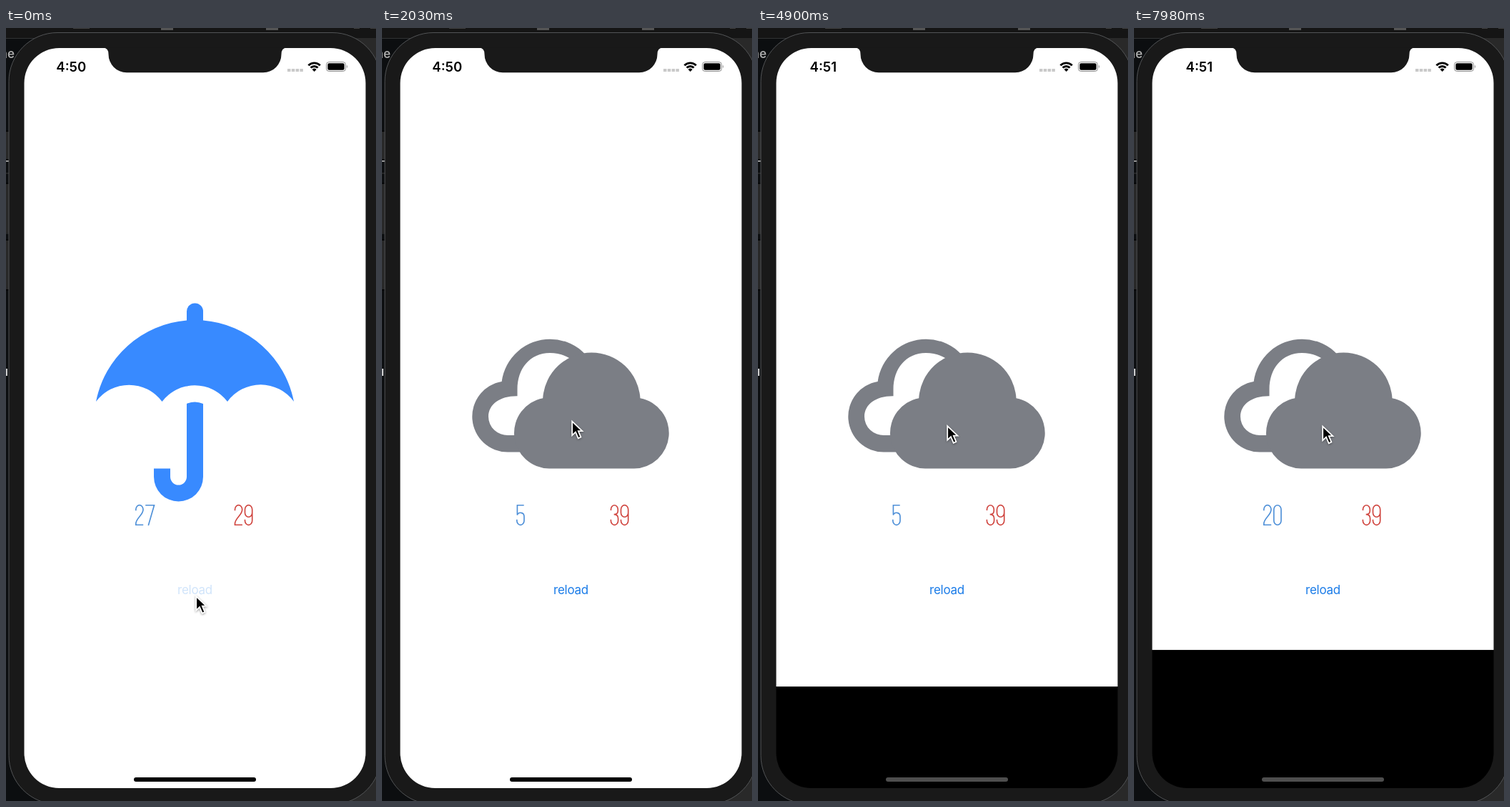
Animation of 518x1080 px, one loop 8000 ms. Source, as an HTML page:

```html
<!DOCTYPE html>
<html lang="en">
<head>
<meta charset="utf-8">
<title>Weather reload</title>
<style>
  html, body { margin: 0; width: 100%; height: 100%; overflow: hidden; background: #0c0e10; }
  svg { display: block; width: 518px; height: 1080px; }
  text { font-family: Inter, "Liberation Sans", sans-serif; }
  .button { font-size: 17px; letter-spacing: -.25px; text-anchor: middle; }
  .digits { fill: none; stroke-width: 1.65; }
  #cursor { filter: drop-shadow(0 1px 1.5px rgba(0, 0, 0, .4)); }
</style>
</head>
<body>
<svg viewBox="0 0 518 1080">
  <defs>
    <clipPath id="view"><rect x="25" y="28" width="479" height="1035"/></clipPath>
  </defs>

  <!-- desktop behind the phone -->
  <rect width="518" height="1080" fill="#0c0e10"/>
  <rect x="480" width="38" height="1080" fill="#292929"/>
  <rect width="518" height="14" fill="#151515"/>
  <path d="M0 14.5H50" stroke="#303234"/>
  <path d="M94 0h23M487 0h8M510 0h8" stroke="#505050" stroke-width="1.5"/>
  <path d="M217 0h17v3h-17zM364 0h17v3h-17z" fill="#555"/>
  <path d="M0 145h5v38H0zM0 218h5v68H0zM0 297h5v68H0z" fill="#282828"/>
  <path d="M0 144h5M0 217h5M0 296h5M0 366h5" stroke="#000"/>
  <path d="M0 203h5M0 287h5" stroke="#3c3c3c"/>
  <path d="M0 186h4" stroke="#999" stroke-width="2"/>
  <path d="M0 476h2v10H0z" fill="#ccc"/>
  <text x="12" y="42" font-size="17" font-weight="600" text-anchor="end" fill="#aaa">ne</text>

  <g clip-path="url(#view)">
    <rect x="25" y="28" width="479" height="1035" fill="#fff"/>

    <g id="umbrella" fill="#388aff">
      <path d="M126 522A141 141 0 0 1 253 408.5V396a11.5 11.5 0 0 1 23 0V408.5A141 141 0 0 1 403 522
        A57.5 57.5 0 0 0 310 522A57.5 57.5 0 0 0 218.5 522A57.5 57.5 0 0 0 126 522Z"/>
      <path d="M253 525Q264.5 520 276 525V627a34.5 34.5 0 0 1-69 0V615.5h23V627a11.5 11.5 0 0 0 23 0Z"/>
    </g>

    <g id="cloud" fill="#7b7e85">
      <path d="M167.6 494A68.3 68.3 0 0 1 303 494V592.5H176A49.6 49.6 0 0 1 167.6 494Z"/>
      <path fill="#fff" d="M262 461Q250 454 235 454C207 454 189.5 476 189.5 505V514.3
        C165 514 149 526 149 543A27 26 0 0 0 177 569H240L290 500Z"/>
      <path d="M225.2 517.2A68.3 68.3 0 0 1 361.5 517.2A49.6 49.6 0 0 1 353 615.5H234
        A49.6 49.6 0 0 1 225.2 517.2Z"/>
    </g>

    <g id="low" class="digits" stroke="#4f90d8"></g>
    <g id="high" class="digits" stroke="#d04640"></g>
    <text id="reload" class="button" x="264.5" y="791" fill="#1b7ce8">reload</text>

    <g id="modal">
      <rect x="25" y="28" width="479" height="1036"/>
      <text id="close" class="button" x="264.5" y="551" fill="#1c6dde">Close</text>
    </g>

    <!-- status bar: black with opacity, so it vanishes over the dark view -->
    <text id="clock" x="91.3" y="61" font-size="18.6" font-weight="600" text-anchor="middle"></text>
    <path d="M394 59h4.5M399.8 59h4.5M405.6 59h4.5M411.4 59h4.5" stroke="#000" stroke-opacity=".21" stroke-width="4"/>
    <path d="M423.4 52.3a11.6 11.6 0 0 1 16.4 0M426.6 55.6a7 7 0 0 1 10 0" fill="none" stroke="#000" stroke-width="2.9"/>
    <path d="M431.6 61l-3-3a4.3 4.3 0 0 1 6 0z"/>
    <rect x="448.5" y="47.5" width="27" height="13" rx="3.8" fill="none" stroke="#000" stroke-opacity=".44"/>
    <rect x="450.3" y="49.3" width="23.4" height="9.4" rx="2.2"/>
    <path d="M477 51.8q2 2.2 0 4.4z" fill-opacity=".44"/>

    <rect id="home" x="179" y="1047" width="171" height="6" rx="3"/>
  </g>

  <!-- bezel with the screen cut out, then the notch -->
  <path fill="#191919" fill-rule="evenodd" stroke="none" d="M72 6.5H457A68 68 0 0 1 525 74.5V1016.5
    A68 68 0 0 1 457 1084.5H72A68 68 0 0 1 4 1016.5V74.5A68 68 0 0 1 72 6.5Z
    M74.5 28H454.5A49 49 0 0 1 503.5 77V1013A49 49 0 0 1 454.5 1062H74.5A49 49 0 0 1 25.5 1013V77A49 49 0 0 1 74.5 28Z"/>
  <rect x="4" y="6.5" width="521" height="1078" rx="68" fill="none" stroke="#525456"/>
  <path fill="#191919" d="M136 27.5Q143.5 28 143.5 36.5A25.5 25.5 0 0 0 169 62.3H360
    A25.5 25.5 0 0 0 385.5 36.5Q385.5 28 393 27.5Z"/>

  <g id="cursor">
    <path d="M1.2 3V22.6L6 18L9.7 26.7L13.4 25.1L9.8 16.6H15.4Z" stroke="#fff" stroke-width="1.8"/>
  </g>
</svg>

<script>
const LOOP = 8000, HEIGHT = 1034, SLIDE = 505;
const $ = id => document.getElementById(id);
const clamp = v => Math.min(1, Math.max(0, v));

// thin condensed numerals, 29 px tall
const GLYPHS = {
  0: 'M.8 7a5.1 6 0 0 1 10.2 0V22.5a5.1 6 0 0 1-10.2 0Z',
  2: 'M.8 8.5V7a5.1 6.1 0 0 1 10.2 0C11 15 .8 19 .8 27V28.5H11.2',
  3: 'M.8 8.2V6.8a4.9 5.9 0 0 1 9.8 0V9c0 3.6-2 4.9-5.6 4.9c3.8 0 5.9 1.6 5.9 5.5V22.4a5.1 6.2 0 0 1-10.2 0V21',
  5: 'M10.7 1H1.4V14.8C2.6 10.2 11 10 11 17V22.4a5.1 6.2 0 0 1-10.2 0V21',
  7: 'M.2 1H12.5L4.3 29.2',
  9: 'M11 7a5.1 6.1 0 0 0-10.2 0V11.5a5.1 6 0 0 0 10.2 0V7V22.4a5.1 6.2 0 0 1-10.2 0V21'
};

function drawNumber(id, value, center) {
  const chars = String(value), step = 14;
  const left = center - (chars.length * step - 2) / 2;
  const group = $(id);
  if (group.dataset.value === chars) return;
  group.dataset.value = chars;
  group.innerHTML = [...chars].map((c, i) =>
    `<path transform="translate(${left + i * step} 665.8)" d="${GLYPHS[c]}"/>`).join('');
}

const REPORTS = [
  { from: 0, icon: 'umbrella', low: 27, high: 29 },
  { from: 2000, icon: 'cloud', low: 5, high: 39 },
  { from: 5220, icon: 'cloud', low: 20, high: 39 }
];

// press and release of each button; the release starts the transition
const RELOADS = [[-100, 45], [3150, 3300], [6370, 6525]];
const CLOSES = [[1400, 1490], [4620, 4710], [7700, 7812]];

// [time, x, y, sideways bow on the way there]
const MOVES = [
  [0, 265, 791, 0], [850, 265, 791, 0], [1190, 265, 546.5, -8],
  [2400, 265, 546.5, 0], [2660, 266, 752, 2], [2750, 266, 752, 0],
  [2940, 264, 771, 0], [4070, 264, 771, 0], [4480, 264, 553, -13],
  [5680, 264, 553, 0], [6160, 264.5, 769, 3], [6300, 264, 788, 0],
  [6370, 264.5, 783, 0], [7080, 264.5, 783, 0], [7650, 263, 553.5, -5],
  [LOOP, 263, 553.5, 0]
];

// critically damped spring, cut off when the transition ends
function spring(ms) {
  if (ms >= SLIDE) return 1;
  const w = Math.max(0, ms) * Math.sqrt(1000 / 3) / 1000;
  return 1 - (1 + w) * Math.exp(-w);
}

function buttonAlpha(t, taps) {
  const tap = taps.findLast(([down]) => t >= down);
  return tap ? 0.2 + 0.8 * clamp((t - tap[1]) / 400) : 1;
}

function cursorAt(t) {
  const i = MOVES.findIndex(m => m[0] > t);
  const [t0, x0, y0] = MOVES[i - 1], [t1, x1, y1, bow] = MOVES[i];
  const k = (t - t0) / (t1 - t0), e = k * k * (3 - 2 * k);
  return [x0 + (x1 - x0) * e + bow * Math.sin(Math.PI * e), y0 + (y1 - y0) * e];
}

function render(t) {
  const report = REPORTS.findLast(r => t >= r.from);
  for (const id of ['umbrella', 'cloud']) $(id).style.display = id === report.icon ? '' : 'none';
  drawNumber('low', report.low, 194);
  drawNumber('high', report.high, 332.7);

  let cover = 0, glow = 0;
  RELOADS.forEach(([, open], i) => {
    const shut = CLOSES[i][1];
    if (t < open) return;
    cover = t < shut ? spring(t - open) : 1 - spring(t - shut);
    glow = t < shut ? clamp((t - open - 150) / 250) : 1 - clamp((t - shut - 280) / 200);
  });
  $('modal').setAttribute('transform', `translate(0 ${HEIGHT * (1 - cover)})`);
  $('modal').style.display = cover ? '' : 'none';
  const grey = Math.round(78 * glow);
  $('home').setAttribute('fill', `rgb(${grey},${grey},${grey})`);

  $('reload').setAttribute('opacity', buttonAlpha(t, RELOADS));
  $('close').setAttribute('opacity', buttonAlpha(t, CLOSES));
  $('clock').textContent = t < 3150 ? '4:50' : '4:51';
  $('cursor').setAttribute('transform', `translate(${cursorAt(t).join(' ')})`);
}

const start = performance.now();
function tick() {
  render((performance.now() - start) % LOOP);
  requestAnimationFrame(tick);
}
tick();
</script>
</body>
</html>
```
